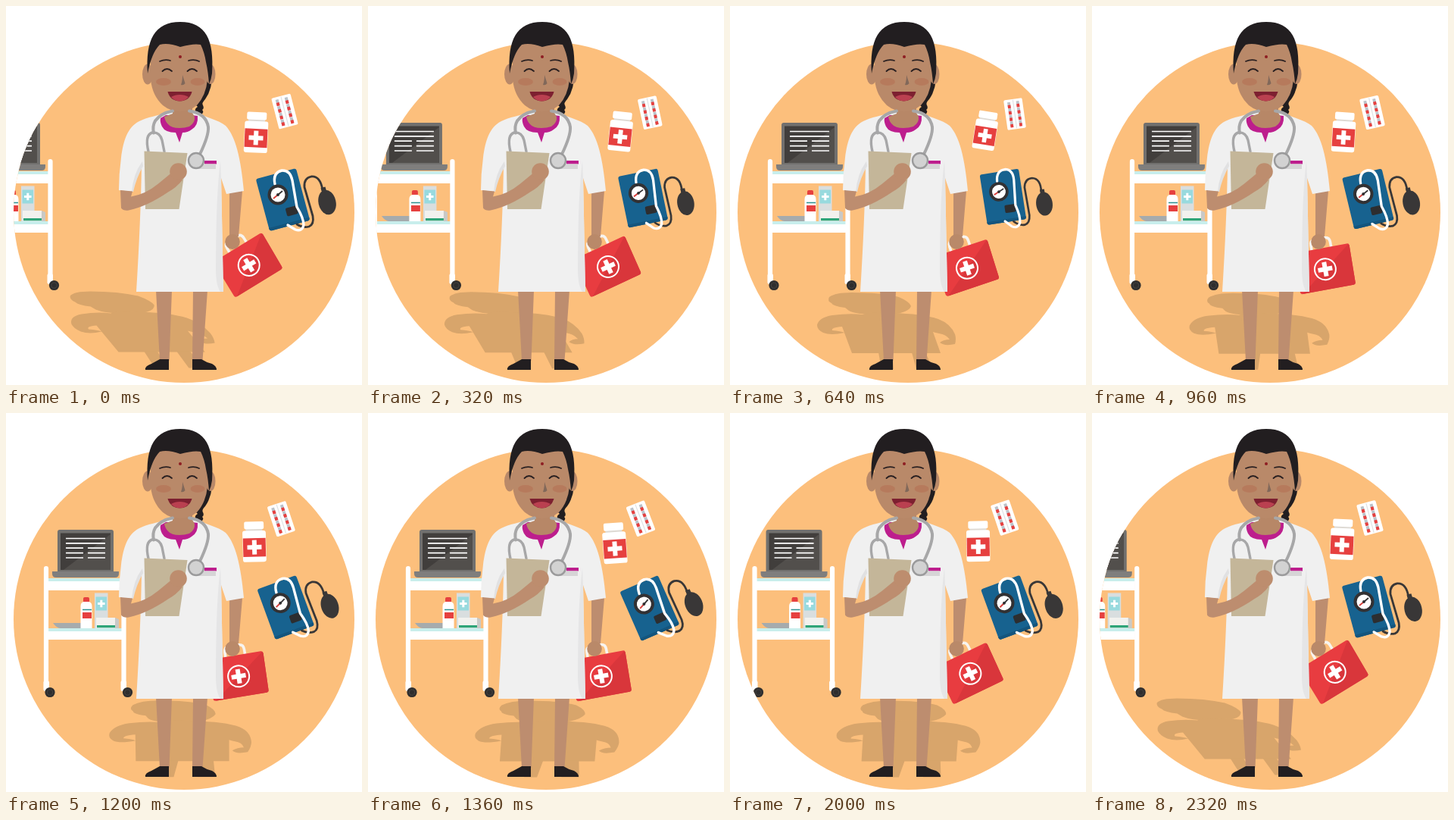
An HTML page for the animation above (2400 ms loop, 470 by 500 pixels).

```html
<!DOCTYPE html>
<html lang="en">
<head>
<meta charset="utf-8">
<title>Doctor</title>
<style>
html, body { margin: 0; width: 100%; height: 100%; overflow: hidden; background: #fff; }
svg { display: block; width: 100vw; height: 100vh; }
.line { fill: none; stroke-linecap: round; stroke-linejoin: round; }
</style>
</head>
<body>
<svg viewBox="0 0 470 500">
  <defs>
    <clipPath id="disc"><circle cx="235" cy="272" r="225"/></clipPath>
    <path id="cross" d="M-3-9.500h6v6.500h6.500v6h-6.500v6.500h-6v-6.500h-6.500v-6h6.500z" fill="#fff"/>
    <g id="wheel">
      <circle r="6.600" fill="#2f2e2e"/>
      <circle r="3.600" fill="none" stroke="#55514e" stroke-dasharray="1.200 1"/>
    </g>
    <g id="pillRow" fill="none" stroke-width="4">
      <path d="M0-17.500V18" stroke="#bcc2c9" stroke-dasharray="8 1"/>
      <path d="M0-13.500V18" stroke="#e6403f" stroke-dasharray="4.500 4.500"/>
    </g>
  </defs>

  <circle cx="235" cy="272" r="225" fill="#fcbf7c"/>

  <g clip-path="url(#disc)">
    <g id="cart">
      <path d="M68 209v-52q0-3 3-3h68q3 0 3 3v52z" fill="#71706e"/>
      <path d="M72 158.500h66V207H72z" fill="#413e3c"/>
      <path d="M138 160v47H76z" fill="#524f4c"/>
      <path d="M79 165.500h52M79 171.800h52M79 178.200h23m6 0h23M79 184.600h23m6 0h23M79 191h23m6 0h23" stroke="#fff" stroke-width="1.700"/>
      <path d="M61 209h88v3q0 5-5 5H66q-5 0-5-5z" fill="#7f7e7d"/>
      <path d="M62 277h37v7H72q-5 0-10-7z" fill="#a6abad"/>
      <path d="M102 249v-4q0-2 2-2h4q2 0 2 2v4z" fill="#e6403f"/>
      <path d="M98.500 284v-29q0-5 4-6h7q4 1 4 6v29z" fill="#fff"/>
      <path d="M101 259.500h12" stroke="#2b9190" stroke-width="1.500"/>
      <path d="M101 263h12v8h-12z" fill="#e6403f"/>
      <path d="M117 237.500h17.500V284H117z" fill="#d9dedf"/>
      <path d="M118.500 242.500h14.500v18h-14.500z" fill="#98dade"/>
      <use href="#cross" transform="translate(125.800 251.500) scale(.5)"/>
      <path d="M119 270h25l5 2v12h-30z" fill="#c9c9c6"/>
      <path d="M119 270h25v14h-25z" fill="#f2f1ee"/>
      <path d="M120 280h24v3.200h-24z" fill="#2fa478"/>
      <path d="M55 218h98v4H55zM55 284h98v4H55z" fill="#c8eeec"/>
      <path d="M55 222h98v12H55zM55 288h98v11H55z" fill="#fff"/>
      <path d="M53 205v158M155.500 205v158" stroke="#fff" stroke-width="6.200" stroke-linecap="round"/>
      <rect x="49.500" y="353" width="7.500" height="14" rx="2.500" fill="#fff"/>
      <rect x="151.500" y="353" width="7.500" height="14" rx="2.500" fill="#fff"/>
      <use href="#wheel" x="58" y="368.500"/>
      <use href="#wheel" x="160.500" y="368.500"/>
    </g>
  </g>

  <g id="shadow" fill="#d8a56b">
    <path d="M131 384q8-6 30-6 38 0 62 6 14 6 16 12-2 6-14 9-14 3-34 2-24 0-34-5l-5-4q-16-2-18-6-6-3-3-8z"/>
    <path d="M115 421q2-10 20-13 22-3 40-1 12-5 38-2 42 1 62 8 16 6 22 20 2 6 0 13-14 3-20-2 5-4 13-4-5-7-14-8-5-1-8-2l10 28H161l-13-35q-15 1-13 5 12 1 16 3-18 4-28 0-8-4-8-10z"/>
    <path d="M196 457h18l2 22h-16zM240 457h18l10 22h-22z"/>
  </g>

  <g id="pills">
    <g transform="translate(368 139) rotate(-14.500)">
      <rect x="-13" y="-21" width="26" height="42" rx="2" fill="#fff"/>
      <path d="M0-20V20" stroke="#dfe1e3" stroke-width="1.200"/>
      <use href="#pillRow" x="-6.200"/>
      <use href="#pillRow" x="6.200"/>
    </g>
  </g>

  <g id="bottle">
    <g transform="translate(330 174) rotate(2.500)">
      <path d="M-11-25h22v4h-22z" fill="#dedad4"/>
      <rect x="-13" y="-34" width="26" height="10" rx="2" fill="#fff"/>
      <rect x="-15.500" y="-22" width="31" height="41.500" rx="3" fill="#fff"/>
      <path d="M-15-12h30v24.500h-30z" fill="#e6403f"/>
      <use href="#cross"/>
    </g>
  </g>

  <g id="gauge">
    <g transform="translate(365.500 255.500) rotate(-15)">
      <rect x="-27.500" y="-35.500" width="55" height="71" rx="3" fill="#17628f"/>
      <path d="M-27.500 31.500h55v1q0 3-3 3h-49q-3 0-3-3z" fill="#14557d"/>
      <rect x="0" y="12" width="15" height="11" rx="2" fill="#2d2e30"/>
    </g>
    <path class="line" d="M384 288q8 5 16 3 7-3 5-14l-11-38q-1-12 9-14 12-1 15 18" stroke="#393737" stroke-width="2.800"/>
    <path class="line" d="M355 235q-3-15 9-18 11-1 14 13l6 35q9 15 9 24-2 9-11 6l-10-6" stroke="#fff" stroke-width="3.400"/>
    <ellipse cx="424" cy="259" rx="11.500" ry="16.500" transform="rotate(-13 424 259)" fill="#393737"/>
    <path d="M415.500 240l6-1.500 2 7-6 1.500z" fill="#393737"/>
    <circle cx="359" cy="249" r="13.500" fill="#323133"/>
    <circle cx="359" cy="249" r="9.500" fill="#fff"/>
    <path d="M353 254l6-5" stroke="#d9403c" stroke-width="2"/>
    <path d="M358 250l7-6" stroke="#323133" stroke-width="1.800"/>
    <circle cx="359" cy="249" r="2" fill="#323133"/>
  </g>

  <g id="bag">
    <path class="line" d="M-12 12V4q0-7 7-7H7q7 0 7 7v8" stroke="#f7f4f0" stroke-width="3.600"/>
    <path d="M-34 10h69q3 0 3 3l-1 49q0 3-3 3h-68q-3 0-3-3V13q0-3 3-3z" fill="#e83c40"/>
    <path d="M37 11l1 2-1 49q0 3-3 3h-68z" fill="#d9363b"/>
    <circle cx="1" cy="38" r="14" fill="none" stroke="#fff" stroke-width="2"/>
    <use href="#cross" x="1" y="38"/>
  </g>

  <g id="doctor">
    <path d="M198 375h21l-3.500 93H203zM247 375h19l-6.500 93H246z" fill="#bd8d6f"/>
    <path d="M184 480q-1-5 8-8l11-6h12v14zM246 480v-14h12q6 4 14 6 6 3 6 8z" fill="#221e20"/>
    <path d="M295 245l17-1-5 60h-12z" fill="#bd8d6f"/>
    <ellipse cx="299" cy="311" rx="9.800" ry="10" fill="#b98969"/>
    <path d="M219 140C200 144 186 147 176 152 160 160 155 178 152 200q-3 22-3 43l18 2q4-22 12-35-1 70-7 167h115l-3-150 7 21 23-4C310 200 303 172 290 158 280 150 264 147 250 140z" fill="#f0f0f0"/>
    <path d="M166 245q2-24 14-40l1 6q-9 16-13 34z" fill="#e1e1e2"/>
    <path d="M283 204l1 23 3 150h-4q-6-8-6-30 0-95 6-143z" fill="#e5e5e6"/>
    <path d="M204 148l7-4h34l8 1q1 13-8 18-5 4-12 4l-4 13-5-13q-14 0-18-8-3-6-2-11z" fill="#bd1e8d"/>
    <path d="M209 146l11-4v-10h26v9l3 5q1 8-7 13-6 2-13 2-11 0-15-5-4-4-5-10z" fill="#b78767"/>
    <path d="M262 88h10q1 21-9 35-5 5-3 8 2 4-1 6 3 3-1 6-6 1-8-4-1-4 3-6-5-4-1-8 9-14 10-37z" fill="#221e20"/>
    <g fill="#b98969">
      <ellipse cx="187" cy="90" rx="7" ry="13.500"/>
      <ellipse cx="270" cy="90" rx="6.500" ry="13"/>
      <path d="M191 50h75v47q-2 21-14 34-10 8-22 8-13 0-23-8-14-13-16-34z"/>
    </g>
    <path d="M187 89C184 45 196 21 230 21 264 21 275 45 272 89q-1 8-4 14-1-16-4-29-2-13-7-23-9-2-27 3-16-6-27-3-11 11-16 38z" fill="#221e20"/>
    <circle cx="230" cy="67" r="2" fill="#8e1d22"/>
    <g class="line" stroke="#2a2021">
      <path d="M203 73q7-3 14-1M241 72q8-2 14 1" stroke-width="1.800"/>
      <path d="M206.500 86q6-6 12.500 0M239.500 86q6-6 12.500 0" stroke-width="1.800"/>
    </g>
    <g fill="#b56d51" opacity=".5">
      <ellipse cx="208" cy="100" rx="10" ry="5"/>
      <ellipse cx="253" cy="100" rx="9.500" ry="5"/>
    </g>
    <path d="M233 91l3.500 11q-2 3-5.500 2 2-5 2-13z" fill="#81685a"/>
    <path d="M213.500 113h32q-3 12-16 12.500-13-.5-16-12.500z" fill="#7d2030"/>
    <path d="M218 120q5-3 11.500-3t11.500 3q-4 5-11.500 5.500-7.500-.5-11.500-5.500z" fill="#ba4050"/>

    <path d="M262 204h16v4.500h-16z" fill="#bd1e8d"/>
    <path d="M252 208.500h25v6.500h-25z" fill="#d6d5d6"/>
    <g class="line" stroke="#a7a7a8" stroke-width="4">
      <path d="M220 138.500q-16 3-23 13-4 7-2 16M242 138.500q22 3 25 21 1 11-11 36"/>
      <path d="M188 192q-5-22 5-25 10-1 13 10l3 15" stroke-width="3.400"/>
    </g>
    <circle cx="251" cy="204" r="10" fill="#d2d2d2" stroke="#9a9a9b" stroke-width="2.400"/>

    <path d="M182.500 191.500l57 2.500-11 74h-44.500z" fill="#c4b699"/>
    <path d="M151 243l16 1.500-2 7q19-3 36-17l17-14q8 3 15 9-8 10-19 16-28 19-52 24-7 1-10-3z" fill="#bd8d6f"/>
    <circle cx="227.500" cy="218.500" r="11.300" fill="#bd8d6e"/>
  </g>
</svg>
<script>
const LOOP = 2400, STEP = 80;
const TIMES = [0, 320, 640, 960, 1360, 1760, 2320];
const N = TIMES.length;

// Each list gives the change from the first pose at TIMES.
const swings = {
  pills: {
    pivot: [368, 139],
    x: [0, 4.3, 8, 2, -8, -7.5, -1],
    y: [0, 1.7, 3.5, 1.5, 0.3, -0.5, -0.5],
    turn: [0, 2.5, 6.5, 1.5, -6.5, -6.5, -0.5]
  },
  bottle: {
    pivot: [330, 174],
    x: [0, 3, 6.5, 2, -4, -4, 0],
    y: [0, -1.5, -3, -0.5, 5, 4.5, 0],
    turn: [0, 3.5, 6.5, 1, -6.5, -6, 0]
  },
  gauge: {
    pivot: [365.5, 255.5],
    x: [0, -2.5, -5.1, -1.1, 6.3, 6.3, 0],
    y: [0, -2, -3.7, -1, 2, 2, 0],
    turn: [0, 3.3, 6.2, 1.5, -8.7, -8.7, -0.2]
  }
};
const swingSize = [1, 0.97, 0.945, 0.98, 1, 1, 1];
const bagTurn = [0, 6.4, 13, 21, 21, 12.1, 0];

const wrap = i => (i + N) % N;
const timeAt = i => TIMES[wrap(i)] + LOOP * Math.floor(i / N);

// Smooth periodic curve through values at TIMES.
function curve(values, t) {
  const at = i => values[wrap(i)];
  const span = i => timeAt(i + 1) - timeAt(i);
  const rise = i => (at(i + 1) - at(i)) / span(i);
  const slope = i => (rise(i - 1) * span(i) + rise(i) * span(i - 1)) / (span(i - 1) + span(i));
  let i = N - 1;
  while (TIMES[i] > t) i--;
  const h = span(i), u = (t - TIMES[i]) / h, v = 1 - u;
  return at(i) * (1 + 2 * u) * v * v + at(i + 1) * (3 - 2 * u) * u * u
    + h * u * v * (slope(i) * v - slope(i + 1) * u);
}

function ease(u) {
  u = Math.min(1, Math.max(0, u));
  return u < 0.5 ? 4 * u ** 3 : 1 - 4 * (1 - u) ** 3;
}

function lean(t) {
  if (t <= 960) return t / 320;
  if (t <= 1760) return 3 + (t - 960) / 400;
  return 5 * (1 - ease((t - 1760) / 640));
}

const place = (id, transform) => document.getElementById(id).setAttribute("transform", transform);

function draw(t) {
  const away = t < 1200 ? 1 - ease((t + 10) / 640) : ease((t - 1760) / 640);
  place("cart", `translate(${-97 * away} 0)`);

  // The shadow leans from the feet and widens as it swings right.
  const u = lean(t), skew = (u - 2) * 0.234, wide = 1 + 0.006 * (u * u - 4);
  place("shadow", `matrix(${wide} 0 ${-skew} 1 ${484 * skew + 150 * (1 - wide)} ${0.8 * (u - 2)})`);

  const size = curve(swingSize, t);
  for (const [id, { pivot: [px, py], x, y, turn }] of Object.entries(swings)) {
    place(id, `translate(${px + curve(x, t)} ${py + curve(y, t)}) rotate(${curve(turn, t)})`
      + ` scale(${size}) translate(${-px} ${-py})`);
  }
  place("bag", `translate(300 310) rotate(${curve(bagTurn, t) - 31.5})`);
}

const start = performance.now();
function tick() {
  const t = (performance.now() - start) % LOOP;
  draw(Math.floor(t / STEP) * STEP);
  requestAnimationFrame(tick);
}
tick();
</script>
</body>
</html>
```
